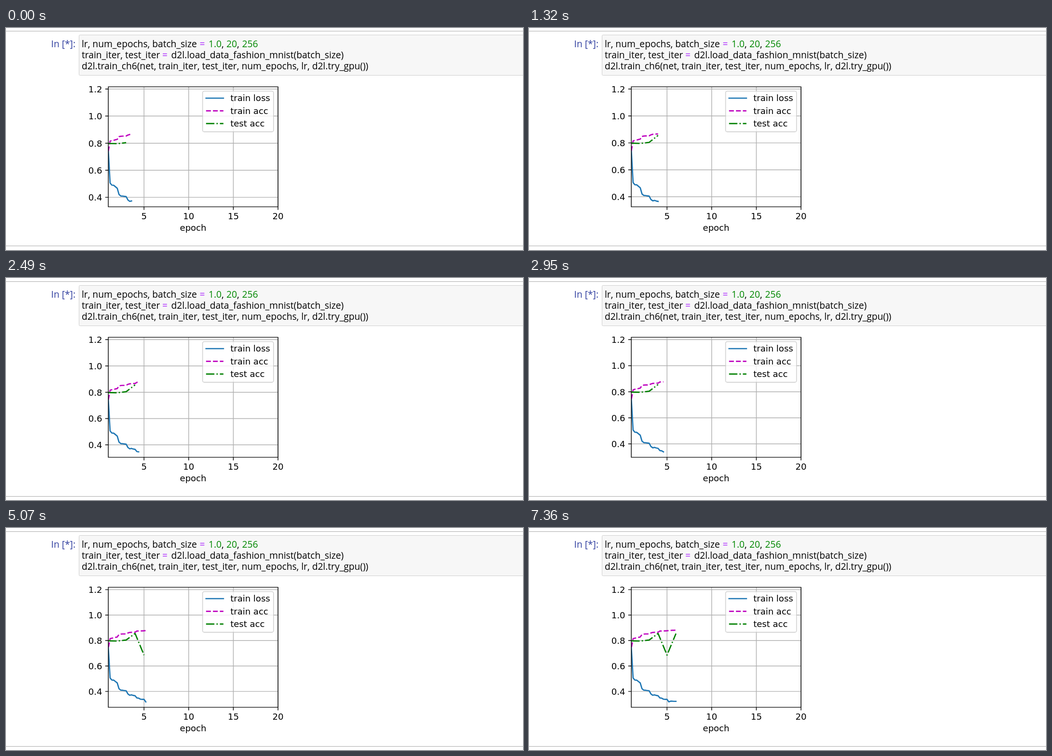
Write an HTML page that moves like this. It is 1072 by 462 pixels and loops after 8 s.

```html
<!DOCTYPE html>
<html lang="en">
<head>
<meta charset="utf-8">
<title>Training curves</title>
<style>
  html, body { margin: 0; width: 100%; height: 100%; overflow: hidden; background: #fff; }
  svg { display: block; width: 1072px; height: 462px; }
  .code { font: 19.2px "Open Sans", "Noto Sans", sans-serif; }
  .plot { font: 18.02px "DejaVu Sans", sans-serif; }
  text { white-space: pre; }
  .op { fill: #a2f; }
  .num { fill: #080; }
  .grid, .axis, .curve { fill: none; }
  .grid { stroke: #b0b0b0; stroke-width: 1.44; }
  .axis { stroke: #000; stroke-width: 1.44; }
  .curve { stroke-width: 2.7; stroke-linejoin: round; }
  .loss { stroke: #1f77b4; stroke-linecap: square; }
  .train { stroke: #bf00bf; stroke-dasharray: 10 4.325; }
  .test { stroke: #008000; stroke-dasharray: 17.3 4.325 2.7 4.325; }
</style>
</head>
<body>
<svg viewBox="0 0 1072 462">
  <clipPath id="area"><rect x="212.1" y="122.4" width="351.9" height="249.75"/></clipPath>
  <g id="page">
    <path d="M0 6.5H1072M0 453.5H1072" stroke="#ababab"/>
    <rect x="151.5" y="14.5" width="940" height="84" rx="2" fill="#f7f7f7" stroke="#cfcfcf"/>
    <g class="code">
      <text x="144" y="40" text-anchor="end" fill="#303f9f">In [*]:</text>
      <text x="157" y="40">lr, num_epochs, batch_size <tspan class="op" x="401.5">=</tspan> <tspan class="num" x="420">1.0</tspan>, <tspan class="num" x="457">20</tspan>, <tspan class="num" x="489.5">256</tspan></text>
      <text x="157" y="63">train_iter, test_iter <tspan class="op" x="324">=</tspan> <tspan x="342.5">d2l.load_data_fashion_mnist(batch_size)</tspan></text>
      <text x="157" y="86">d2l.train_ch6(net, train_iter, test_iter, num_epochs, lr, d2l.try_gpu())</text>
    </g>
    <g class="plot">
      <g id="chart"></g>
      <rect x="407.6" y="131.4" width="147.2" height="84.6" rx="3.6" fill="#fff" stroke="#ccc" stroke-width="1.8" opacity=".8"/>
      <g id="legend"></g>
      <text x="388" y="422.3" text-anchor="middle">epoch</text>
    </g>
  </g>
</svg>
<script>
const DURATION = 8000, SCROLL_AT = 2000;
const changes = [0, 380, 830, 1320, 2000, 2490, 2950, 3470, 3940, 4410, 5070, 5470, 5910, 6390, 6890, 7360];
const left = 212.1, top_ = 122.4, width = 351.9, height = 249.75;
const right = left + width, bottom = top_ + height;

// Five training readings per epoch, one test reading at the end of each.
const loss = [
  1.176, .97, .87, .80, .75,
  .506, .490, .489, .478, .467,
  .421, .410, .409, .407, .405,
  .380, .370, .373, .3685, .366,
  .349, .347, .339, .3375, .338,
  .318, .323, .323, .322, .322];
const trainAcc = [
  .60, .67, .70, .72, .74,
  .815, .819, .821, .825, .828,
  .848, .851, .852, .852, .853,
  .860, .864, .865, .866, .866,
  .875, .875, .876, .876, .877,
  .878, .880, .881, .881, .882];
const testAcc = [.798, .796, .804, .856, .686, .855];

const $ = id => document.getElementById(id);
const path = (cls, d) => `<path class="${cls}" d="${d}"/>`;
const label = (x, y, anchor, s) => `<text x="${x}" y="${y}" text-anchor="${anchor}">${s}</text>`;
const xOf = epoch => left + (epoch - 1) / 19 * width;

function chart(step) {
  const readings = 21 + step;
  const tests = Math.floor(readings / 6), trains = readings - tests;

  // Autoscaled axis with a 5% margin at both ends.
  const high = Math.max(...loss), low = Math.min(...loss.slice(0, trains));
  const range = high - low, yMin = low - .05 * range;
  const yOf = v => bottom - (v - yMin) / (1.1 * range) * height;
  const curve = (cls, values, count, perEpoch) => path('curve ' + cls, 'M' +
    values.slice(0, count).map((v, i) => `${xOf((i + 1) / perEpoch)} ${yOf(v)}`).join('L'));

  let grid = '', ticks = '', labels = '';
  for (const epoch of [5, 10, 15, 20]) {
    const x = xOf(epoch);
    grid += `M${x} ${top_}V${bottom}`;
    ticks += `M${x} ${bottom}v6.3`;
    labels += label(x, bottom + 26.2, 'middle', epoch);
  }
  for (const v of [.4, .6, .8, 1, 1.2]) {
    const y = yOf(v);
    grid += `M${left} ${y}H${right}`;
    ticks += `M${left} ${y}h-6.3`;
    labels += label(left - 12.6, y + 6.85, 'end', v.toFixed(1));
  }
  return path('grid', grid) +
    '<g clip-path="url(#area)">' +
      curve('loss', loss, trains, 5) +
      curve('train', trainAcc, trains, 5) +
      curve('test', testAcc, tests, 1) +
    '</g>' +
    path('axis', `M${left} ${top_}H${right}V${bottom}H${left}Z${ticks}`) + labels;
}

$('legend').innerHTML = [['loss', 'train loss'], ['train', 'train acc'], ['test', 'test acc']]
  .map(([cls, name], i) => {
    const y = 146 + 26.45 * i;
    return path('curve ' + cls, `M414.8 ${y}h36`) + label(465.2, y + 6.3, 'start', name);
  }).join('');

let shown = -1;
function frame(now) {
  const t = now % DURATION;
  const step = changes.filter(c => c <= t).length - 1;
  if (step !== shown) {
    shown = step;
    $('chart').innerHTML = chart(step);
    $('page').setAttribute('transform', `translate(0 ${t >= SCROLL_AT ? 1 : 0})`);
  }
  requestAnimationFrame(frame);
}
frame(0);
</script>
</body>
</html>
```
